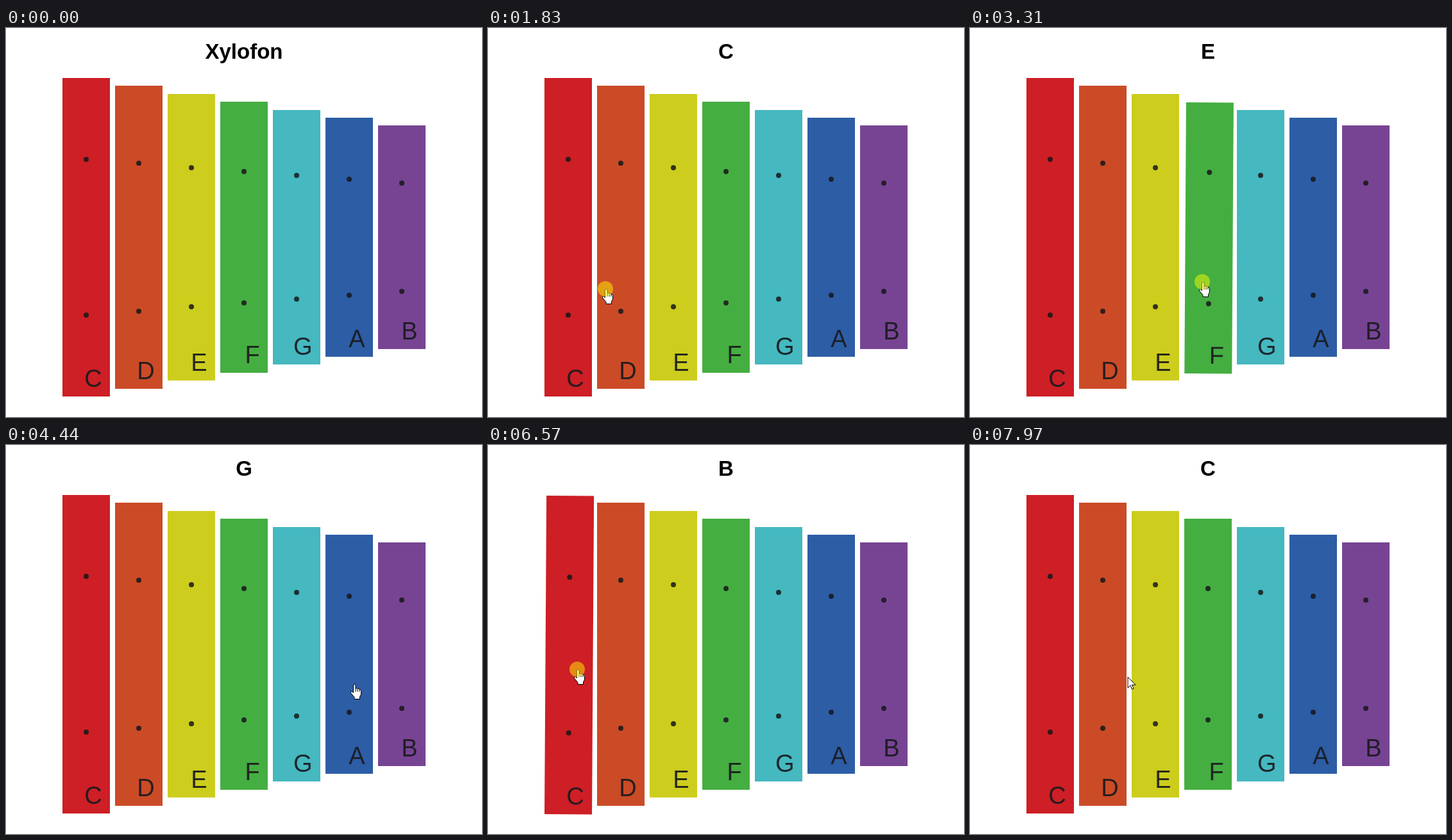
Recreate the animation shown at these times as an HTML page with a canvas. Size 742x607 px, loop 8000 ms.

```html
<!DOCTYPE html>
<html lang="en">
<head>
<meta charset="utf-8">
<title>Xylofon</title>
<style>
html, body { margin: 0; width: 100%; height: 100%; overflow: hidden; background: #fff; }
canvas { display: block; }
</style>
</head>
<body>
<canvas id="stage" width="742" height="607"></canvas>
<script>
const ctx = document.getElementById('stage').getContext('2d');
const FONT = 'Arial, "Liberation Sans", sans-serif';
const LOOP = 8000, MID = 326.5, BAR_W = 74;
const SHAKE_DELAY = 20, SHAKE_TIME = 80;

const bars = ['#cd1f25', '#cb4b27', '#cdcd1e', '#45ae41', '#45b8c0', '#2d5da5', '#774493']
  .map((color, i) => ({
    color,
    note: 'CDEFGAB'[i],
    x: 88 + 82 * i,
    top: Math.round(78 + 12.4 * i),
    bottom: Math.round(575 - 12.4 * i),
    dot: Math.floor(121.3 - 6.2 * i) + .5
  }));

const barAt = (x, y) =>
  bars.find(b => x >= b.x && x <= b.x + BAR_W && y >= b.top && y <= b.bottom);

// Pointer stops: x, y, arrival time, press time
const stops = [
  [142, 412, 900, 1080],
  [183, 407, 1630, 1830],
  [266, 397, 2190, 2550],
  [362, 396, 3010, 3290],
  [458, 385, 3740, 4020],
  [542, 373, 4440, 4700],
  [635, 371, 5160, 5520],
  [139, 350, 6390, 6550],
  [262, 362, 6780, 6930],
  [144, 352, 7690, 7740],
  [246, 362, 7970, LOOP]
].map(([x, y, arrive, press]) =>
  ({ x, y, arrive, press, end: press + SHAKE_DELAY + SHAKE_TIME, bar: barAt(x, y) }));

const hand = new Path2D('M-.5 2Q-.5 .5 1.3 .5Q3 .5 3 2V7Q4.5 5.8 6 7.5Q7.8 6.6 9 8.4' +
  'Q11.5 8 11.5 10.5V16L9.5 20V23.5H1V20.5L-4.5 14Q-5 11.5 -3 11.5L-.5 13.5Z');
const knuckles = new Path2D('M3 7V12M6 8V12M9 9V12');
const arrow = new Path2D('M0 0V17L4 13.2L6.6 19.2L9 18.2L6.4 12.3H12Z');

// Longer ways take longer; no move begins before the last press is over.
function pointer(t) {
  let at = { x: 312, y: 640, end: 0 };
  for (const stop of stops) {
    const dx = stop.x - at.x, dy = stop.y - at.y;
    const start = Math.max(at.end, stop.arrive - 100 - Math.hypot(dx, dy));
    if (t < stop.arrive) {
      const p = Math.max(0, (t - start) / (stop.arrive - start));
      const e = p * p * (3 - 2 * p);
      return { x: at.x + dx * e, y: at.y + dy * e };
    }
    at = stop;
  }
  return at;
}

function disc(x, y, r, color) {
  ctx.fillStyle = color;
  ctx.beginPath();
  ctx.arc(x, y, r, 0, 2 * Math.PI);
  ctx.fill();
}

// Tilts right, swings left and returns within one shake.
function shake(cx, age) {
  const swing = (1 - Math.cos(2 * Math.PI * age / SHAKE_TIME)) / 2;
  ctx.translate(cx + 1.6 + 1.2 * swing, MID + 1.3 * (1 - swing));
  ctx.rotate((.36 - .93 * swing) * Math.PI / 180);
  ctx.translate(-cx, -MID);
}

function drawBar(bar, age) {
  const cx = bar.x + BAR_W / 2;
  ctx.save();
  if (age >= 0) shake(cx, age);
  ctx.fillStyle = bar.color;
  ctx.fillRect(bar.x, bar.top, BAR_W, bar.bottom - bar.top);
  for (const side of [-1, 1]) disc(cx, MID + side * bar.dot, 4, 'rgba(22,22,26,.85)');
  ctx.fillStyle = 'rgba(26,26,30,.92)';
  ctx.font = '38px ' + FONT;
  ctx.textAlign = 'right';
  ctx.fillText(bar.note, bar.x + BAR_W - 12.4, bar.bottom - 15.5);
  ctx.restore();
}

function drawPointer({ x, y }) {
  const over = barAt(x, y);
  const shape = over ? hand : arrow;
  ctx.save();
  ctx.translate(x, y);
  ctx.lineJoin = 'round';
  ctx.strokeStyle = '#000';
  ctx.fillStyle = '#fff';
  ctx.fill(shape);
  ctx.stroke(shape);
  if (over) ctx.stroke(knuckles);
  ctx.restore();
}

function draw(t) {
  ctx.fillStyle = '#fff';
  ctx.fillRect(0, 0, 742, 607);

  const last = stops.filter(s => t >= s.end).pop();
  ctx.fillStyle = '#000';
  ctx.font = 'bold 33px ' + FONT;
  ctx.textAlign = 'center';
  ctx.fillText(last ? last.bar.note : 'Xylofon', 371, 48);

  const pressed = stops.find(s => t >= s.press && t < s.end);
  for (const bar of bars)
    drawBar(bar, pressed && pressed.bar === bar ? t - pressed.press - SHAKE_DELAY : -1);

  const tip = pointer(t);
  drawPointer(tip);
  if (pressed) disc(tip.x, tip.y, 12, 'rgba(255,255,0,.48)');
}

function frame() {
  draw(performance.now() % LOOP);
  requestAnimationFrame(frame);
}
frame();
</script>
</body>
</html>
```
